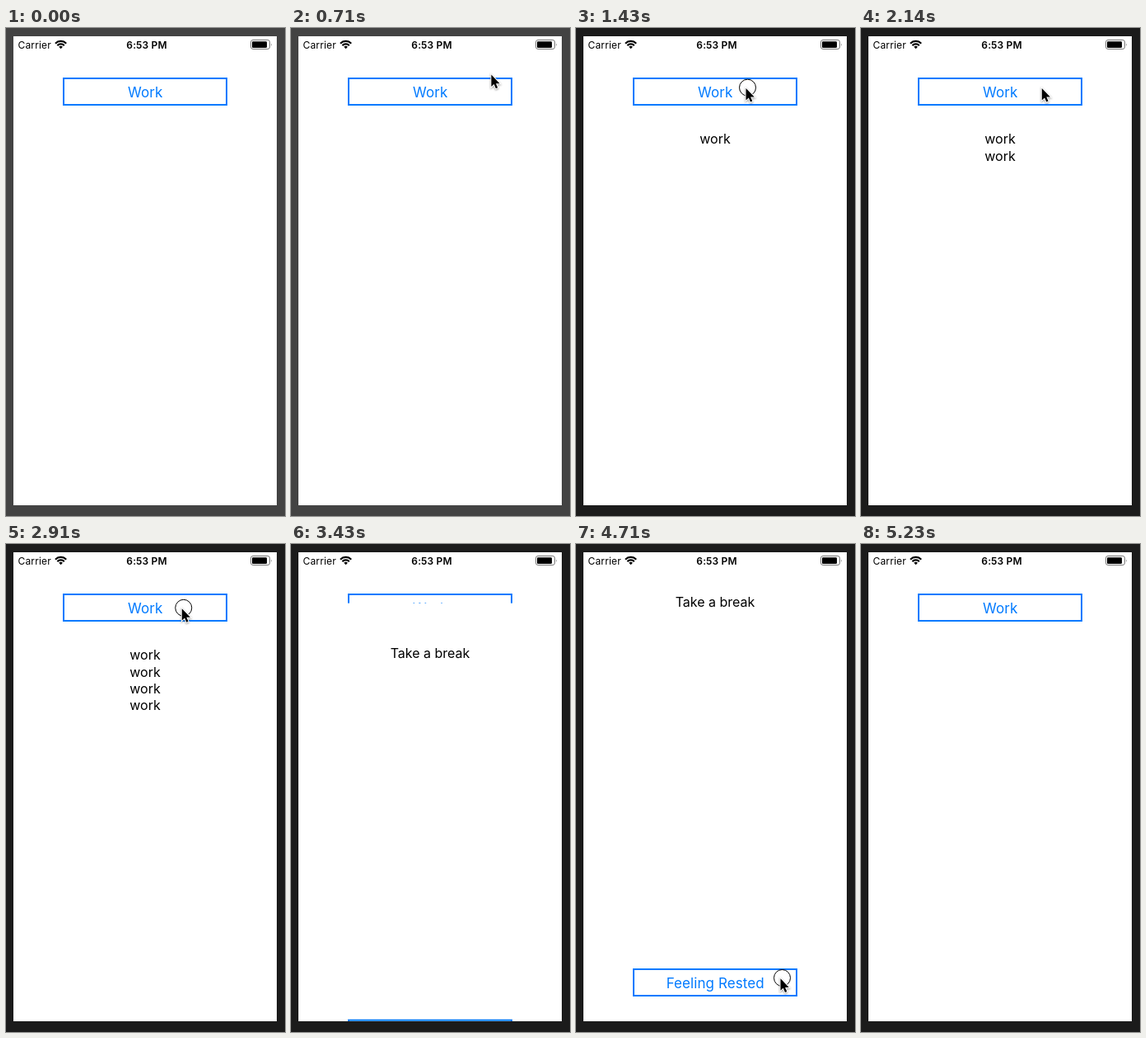
Animation of 339x591 px, one loop 6420 ms. Source, as an HTML page:

```html
<!DOCTYPE html>
<html lang="en">
<head>
<meta charset="utf-8">
<style>
  html, body { margin: 0; width: 100%; height: 100%; overflow: hidden; }
  svg { display: block; }
  text { font: 16px Inter, "Liberation Sans", sans-serif; text-anchor: middle; }
  .button text { font-size: 17px; letter-spacing: .08px; fill: #007aff; }
  .button rect { fill: none; stroke: #007aff; stroke-width: 2; }
  .status text { font-size: 12px; letter-spacing: .15px; }
  .arc { fill: none; stroke: #000; stroke-width: 2.2; }
</style>
</head>
<body>
<svg width="339" height="591" viewBox="0 0 339 591">
  <rect id="backdrop" width="339" height="591"/>
  <svg x="9" y="10" width="320" height="568" viewBox="9 10 320 568">
    <rect x="9" y="10" width="320" height="568" fill="#fff"/>
    <g class="button">
      <rect x="70" y="61" width="198" height="32"/>
      <text x="169.2" y="83.5">Work</text>
    </g>
    <g id="rows"></g>
    <g id="breakScreen">
      <rect x="9" y="10" width="320" height="568" fill="#fff"/>
      <text x="169" y="76">Take a break</text>
      <g class="button">
        <rect x="70" y="515" width="198" height="32"/>
        <text x="169.2" y="537.5">Feeling Rested</text>
      </g>
    </g>
    <g class="status">
      <text x="14.5" y="24.5" style="text-anchor:start">Carrier</text>
      <text x="171" y="24.5" style="font-weight:600">6:53 PM</text>
      <path class="arc" d="M60 18.7a9.3 9.3 0 0 1 13.2 0M62.4 21.2a5.9 5.9 0 0 1 8.4 0"/>
      <path d="M66.6 25.2l-2.3-2.4a3.3 3.3 0 0 1 4.6 0z"/>
      <rect x="297.5" y="14.5" width="23" height="11" rx="2.6" fill="none" stroke="#777"/>
      <rect x="299" y="16.3" width="18" height="7.6" rx="1.2"/>
      <path d="M322.2 18.6q1.6 1.7 0 3.4z" fill="#777"/>
    </g>
  </svg>
  <g id="pointer">
    <circle id="touch" cx="2" cy="-.8" r="10" fill="none" stroke="#000"/>
    <path d="M0 0V14.5L3.3 11.4 5.5 16.6 7.8 15.6 5.6 10.6H10.2Z" stroke="#fff" stroke-width="2"
      paint-order="stroke" style="filter:drop-shadow(0 1px 1px #0006)"/>
  </g>
</svg>
<script>
const LOOP = 6420;
const [backdrop, rows, breakScreen, pointer, touch] =
  ["backdrop", "rows", "breakScreen", "pointer", "touch"].map(id => document.getElementById(id));

// Pointer gestures: start, end, destination; it rests in between
const moves = [
  [420, 710, 243.5, 56.5], [710, 1030, 225, 73], [1080, 1260, 206.5, 73],
  [2080, 2200, 224, 73], [2800, 3030, 210, 80], [3230, 3480, 360, 190],
  [3500, 4100, 340, 459], [4130, 4650, 248.5, 526.3], [4950, 5150, 360, 528]
];
const touches = [[1320, 1610], [1760, 2080], [2200, 3210], [4700, 4890]];
const rowTime = i => 1320 + i * 1300 / 3;

const progress = (t, from, to) => Math.min(1, Math.max(0, (t - from) / (to - from)));
const easeOut = (t, from, to, power) => 1 - (1 - progress(t, from, to)) ** power;
const show = (node, on) => node.setAttribute("visibility", on ? "visible" : "hidden");

function tipAt(t) {
  let x = 252, y = -30;
  for (const [from, to, endX, endY] of moves) {
    const k = easeOut(t, from, to, 2);
    x += (endX - x) * k;
    y += (endY - y) * k;
  }
  return [x, y];
}

for (let i = 0; i < 4; i++)
  rows.innerHTML += `<text x="169" y="${140.4 + 20.3 * i}">work</text>`;

function draw(t) {
  backdrop.setAttribute("fill", t < 1200 ? "#434343" : "#1b1b1b");
  [...rows.children].forEach((row, i) => show(row, t >= rowTime(i) && t < 3800));
  const cover = easeOut(t, 3180, 3660, 3) - easeOut(t, 4850, 5230, 3);
  breakScreen.setAttribute("transform", `translate(0 ${568 * (1 - cover)})`);
  pointer.setAttribute("transform", `translate(${tipAt(t)})`);
  show(touch, touches.some(([down, up]) => t >= down && t < up));
}

const start = performance.now();
function tick() {
  draw((performance.now() - start) % LOOP);
  requestAnimationFrame(tick);
}
tick();
</script>
</body>
</html>
```
